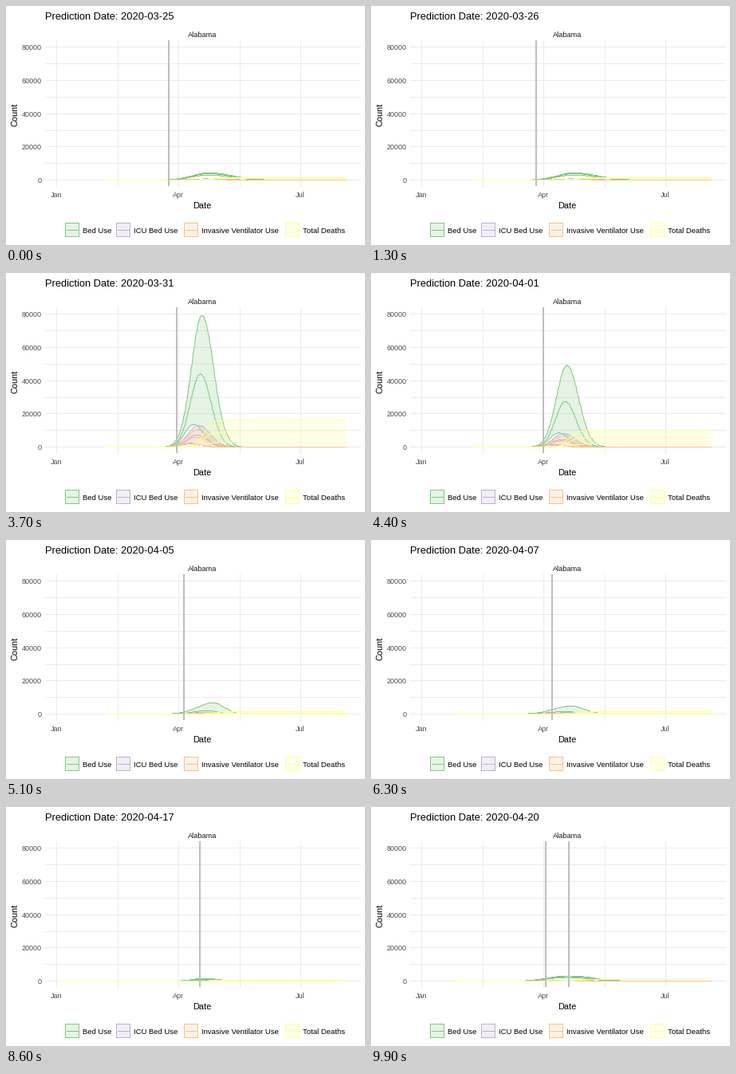
Recreate the animation shown at these times as a matplotlib script. Size 450 by 300 pixels, loop 10000 ms.

```python
import numpy as np
import matplotlib.pyplot as plt
from matplotlib.animation import FuncAnimation
from matplotlib.patches import Polygon, Rectangle

W, H, DPI = 450, 300, 100
PT = 72 / DPI                      # one pixel in points
FRAMES, INTERVAL = 100, 100
LEFT, RIGHT, TOP, BOTTOM = 49, 444, 43, 226
LAST_DAY = 216                     # days since 1 January
U = np.linspace(0, 1, 200)

SERIES = [("Bed Use", "#7FC97F", 74), ("ICU Bed Use", "#BEAED4", 138),
          ("Invasive Ventilator Use", "#FDC086", 223),
          ("Total Deaths", "#FFFF99", 350)]

DATES = [84, 85, 86, 88, 89, 90, 91, 95, 97, 98, 100, 103, 107, 110]
# frames on which each state starts to move and on which the next is reached
DEPART = [4, 13, 20, *range(28, 99, 7)]
ARRIVE = [6, 15, 23, *range(30, 101, 7)]


def px(day):
    return np.floor(63.6 + 1.681 * day)


def py(count):
    return np.floor(218.5 - 2.083e-3 * count)


def forecast(date):
    """First day, upper and mean bed peak, peak day, rise and fall widths."""
    if date < 90:
        return 37, 4400 + 1250 * max(0, date - 87), 3900, 113.6, 12.5, 17
    if date < 92:
        upper = 79500 * 0.62 ** (date - 90)
        return 37, upper, 0.555 * upper, 108.4, 8, 8.6
    if date < 98:
        return 37, 6800, 2100, 117, 12, 8
    upper = 2600 * np.exp((98 - date) / 16)
    return 2, upper, upper * (0.5 + 0.02 * (date - 98)), 110, 9, 11


def curves(date):
    """Days and a (series, band, point) array of counts."""
    start, upper, mean, peak, rise, fall = forecast(date)
    beds = [upper, mean, mean ** 3 / upper ** 2]
    day = start + (LAST_DAY - start) * U

    def bump(height, shift):
        ratio = height / upper
        off = day - peak + shift + 10 * (1 - ratio) ** 2.5
        width = np.where(off < 0, rise, fall) * (0.75 + 0.25 * ratio ** 0.5)
        return height * np.exp(-0.5 * (off / width) ** 2)

    out = [[share * bump(h, shift) for h in beds]
           for share, shift in ((1, 0), (0.165, 2.5), (0.133, 3))]
    grow = 1 / (1 + np.exp(-(day - peak - 1) / (0.36 * rise)))
    out.append([0.0122 * (rise + fall) * h * grow for h in beds])
    return day, np.array(out)


CURVES = [curves(date) for date in DATES]


def label(day):
    month, dom = (4, day - 90) if day > 90 else (3, day - 59)
    return f"Prediction Date: 2020-{month:02d}-{dom:02d}"


def locate(frame):
    """State being left, state being reached and progress between them."""
    for i, (first, last) in enumerate(zip(DEPART, ARRIVE)):
        if frame < last:
            t = max(0, frame - first + 1) / (last - first + 1)
            return i, (i + 1) % len(DATES), t


plt.rcParams["font.family"] = "Liberation Sans"
fig = plt.figure(figsize=(W / DPI, H / DPI), dpi=DPI, facecolor="white")
ax = fig.add_axes([0, 0, 1, 1])
ax.set_xlim(0, W)
ax.set_ylim(H, 0)
ax.axis("off")


def rule(x, y, color, width=1, z=2):
    """Crisp straight line."""
    return ax.plot(x, y, color=color, lw=width * PT, zorder=z,
                   antialiased=False, solid_capstyle="butt")[0]


def text(x, y, s, size, color="black", ha="left", **kw):
    kw.setdefault("va", "baseline")
    return ax.text(x, y, s, fontsize=size * PT, color=color, ha=ha, **kw)


# grid and axis labels
for k in range(0, 90000, 10000):
    rule([LEFT, RIGHT], [py(k)] * 2, "#EBEBEB", z=1)
    if k % 20000 == 0:
        text(44.8, py(k) + 4, str(k), 9, "#4D4D4D", "right")
for i, name in enumerate(("Jan", "", "Apr", "", "Jul")):
    x = px(45.5 * i)
    rule([x, x], [TOP, BOTTOM], "#EBEBEB", z=1)
    text(x, 240.5, name, 9, "#4D4D4D", "center")
text(246, 254, "Date", 11, ha="center")
text(11.5, 136.5, "Count", 11, ha="center", va="center", rotation=90)
text(246, 39, "Alabama", 9.15, "#1A1A1A", "center")
title = text(49.3, 17, "", 12.87)

# legend
for name, color, x in SERIES:
    ax.add_patch(Rectangle((x, 272), 17, 17, facecolor=(color, 0.2),
                           edgecolor=color, lw=PT, antialiased=False))
    rule([x + 2, x + 16], [281, 281], color)
    text(x + 22.2, 285, name, 9.5)

fills, bands = [], []
for i, (_, color, _) in enumerate(SERIES):
    fill = Polygon([(0, 0)] * 3, facecolor=(color, 0.2), lw=0, zorder=3 + i)
    fills.append(ax.add_patch(fill))
    bands.append([ax.plot([], [], color=color, lw=PT, zorder=3 + i,
                          snap=False)[0] for _ in range(3)])
marker = rule([], [], "#BEBEBE", 2, z=9)
leaving = rule([], [], "#BEBEBE", 2, z=9)


def update(frame):
    a, b, t = locate(frame)
    (day_a, ya), (day_b, yb) = CURVES[a], CURVES[b]
    x = px(day_a + (day_b - day_a) * t) + 0.5
    y = py(ya + (yb - ya) * t) + 0.5
    for fill, lines, rows in zip(fills, bands, y):
        for curve, row in zip(lines, rows):
            curve.set_data(x, row)
        fill.set_xy(np.column_stack([np.r_[x, x[::-1]],
                                     np.r_[rows[0], rows[2][::-1]]]))
    now = DATES[a] + (DATES[b] - DATES[a]) * t
    marker.set_data([px(now)] * 2, [TOP, BOTTOM])
    # the last date line stays while its copy travels back
    leaving.set_data([px(DATES[a])] * 2, [TOP, BOTTOM])
    leaving.set_visible(b < a)
    title.set_text(label(DATES[a]))
    return [*fills, *sum(bands, []), marker, leaving, title]


anim = FuncAnimation(fig, update, frames=FRAMES, interval=INTERVAL,
                     init_func=lambda: update(0), repeat=True)
plt.show()
```
